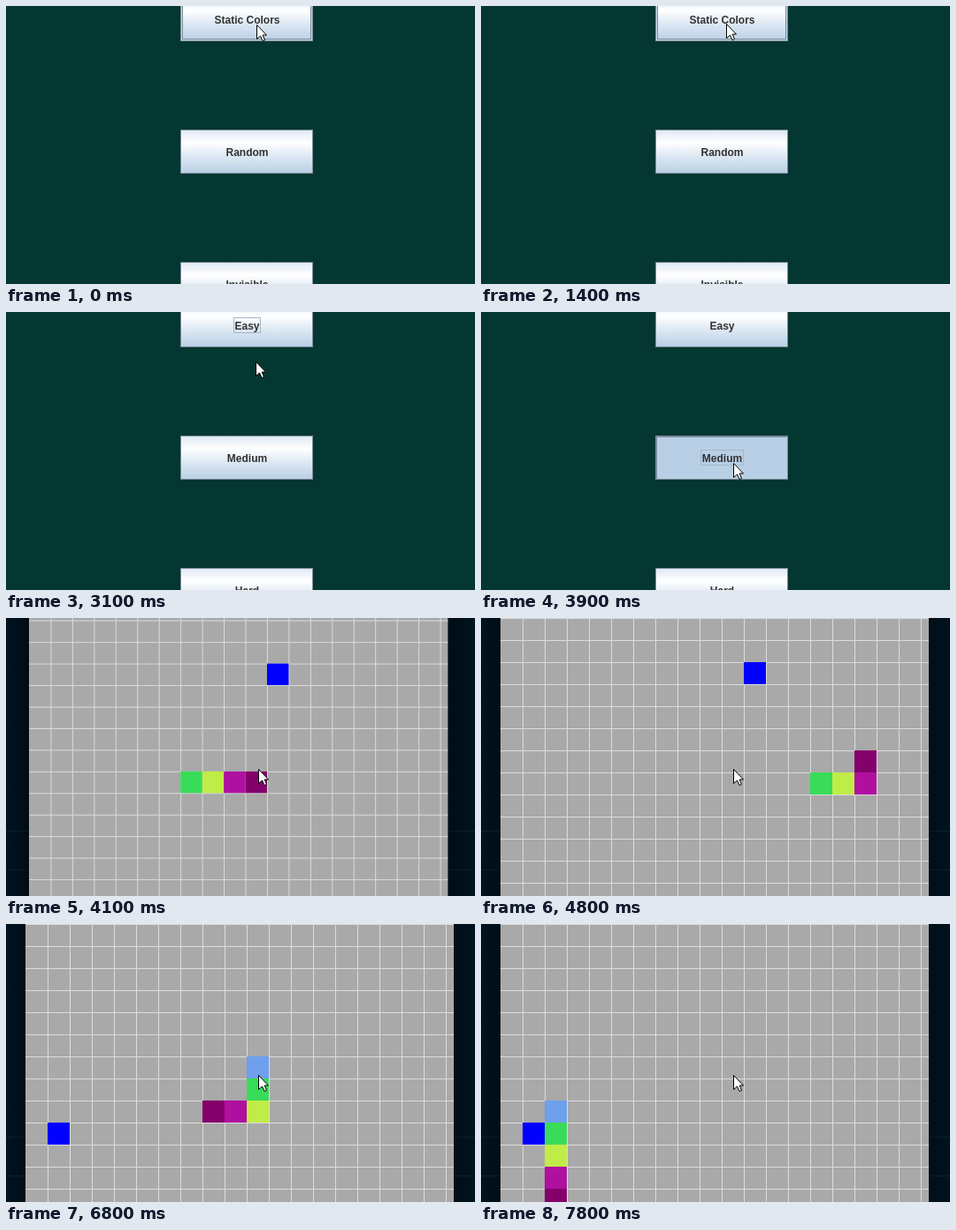
An HTML page with a canvas for the animation above (8 s loop, 530 px wide and 315 px high).

```html
<!DOCTYPE html>
<html lang="en">
<head>
<meta charset="utf-8">
<title>Snake menu</title>
<style>
  html, body { margin: 0; width: 100%; height: 100%; overflow: hidden; background: #043731; }
  canvas { display: block; }
</style>
</head>
<body>
<canvas id="stage" width="530" height="315"></canvas>
<script>
const ctx = document.getElementById('stage').getContext('2d');
const LOOP = 8000, STEP = 100;
const BORDER = '#7a8a99';
const MODES = ['Static Colors', 'Random', 'Invisible'];
const LEVELS = ['Easy', 'Medium', 'Hard'];
const BUTTON = { x: 197, w: 150, h: 50, tops: [-10, 140, 290] };

// Cursor keys: time, x, y
const CURSOR = [
  [0, 283, 21], [100, 283, 62], [300, 282, 296], [500, 276, 184],
  [900, 276, 184], [1400, 277, 20], [1800, 274, 172], [2500, 274, 172],
  [3000, 281, 18], [3400, 283, 171], [3600, 285, 171], [LOOP, 285, 171]
];

const CELL = 25, GRID_LEFT = 22, GRID_RIGHT = 506;
const SNAKE = ['#84006a', '#b010a0', '#c0ec48', '#38dc58', '#6ea0ee'];
const FOOD = '#0000ff';
const path = walk([[7, 7], [16, 7], [16, 2], [10, 2], [10, 8], [2, 8], [2, 12]]);
const FIRST_HEAD = 3, EATEN_AT = 19;

function walk(corners) {
  const cells = [corners[0]];
  for (const [tx, ty] of corners.slice(1)) {
    let [x, y] = cells[cells.length - 1];
    while (x !== tx || y !== ty) {
      x += Math.sign(tx - x);
      y += Math.sign(ty - y);
      cells.push([x, y]);
    }
  }
  return cells;
}

function rect(color, x, y, w, h) {
  ctx.fillStyle = color;
  ctx.fillRect(x, y, w, h);
}

function frame(color, x, y, w, h) {
  ctx.strokeStyle = color;
  ctx.lineWidth = 1;
  ctx.strokeRect(x + .5, y + .5, w - 1, h - 1);
}

function cursorAt(t) {
  const i = CURSOR.findIndex(key => key[0] > t);
  const [t0, x0, y0] = CURSOR[i - 1], [t1, x1, y1] = CURSOR[i];
  const p = (t - t0) / (t1 - t0);
  return [Math.round(x0 + (x1 - x0) * p), Math.round(y0 + (y1 - y0) * p)];
}

function drawCursor([x, y]) {
  const outline = [[0, 0], [0, 16], [4, 12.5], [6.5, 18], [9, 17], [6.7, 11.5], [11, 11.5]];
  ctx.beginPath();
  for (const [dx, dy] of outline) ctx.lineTo(x + dx + .5, y + dy + .5);
  ctx.closePath();
  ctx.fillStyle = '#fff';
  ctx.strokeStyle = '#000';
  ctx.lineWidth = 1;
  ctx.fill();
  ctx.stroke();
}

function drawButton(label, y, { hover, pressed, focus }) {
  const { x, w, h } = BUTTON;
  if (pressed) {
    rect('#b8cfe5', x, y, w, h);
    frame(BORDER, x, y, w, h);
    rect(BORDER, x, y, w, 2);
    rect(BORDER, x, y, 2, h);
  } else {
    const shade = ctx.createLinearGradient(0, y, 0, y + h);
    [[0, '#dde8f3'], [.3, '#fff'], [.6, '#dde8f3'], [1, '#b8cfe5']]
      .forEach(stop => shade.addColorStop(...stop));
    rect(shade, x, y, w, h);
    frame(BORDER, x, y, w, h);
    if (hover) {
      frame('#c8dbee', x + 1, y + 1, w - 2, h - 2);
      frame(BORDER, x + 2, y + 2, w - 4, h - 4);
    }
  }
  ctx.font = 'bold 12px "Liberation Sans", Arial, sans-serif';
  ctx.textAlign = 'center';
  ctx.fillStyle = '#333';
  ctx.fillText(label, x + w / 2 + .5, y + 30);
  if (focus) {
    const half = Math.round(ctx.measureText(label).width / 2) + 1;
    frame('#a3b8cc', x + w / 2 - half, y + 16, half * 2 + 1, 18);
  }
}

function drawMenu(t, [cx, cy]) {
  const levels = t >= 2000;
  const clicked = t === 1900 || t === 3900;
  const focused = clicked ? 1 : t >= 2100 ? 0 : -1;
  rect('#043731', 0, 0, 530, 315);
  (levels ? LEVELS : MODES).forEach((label, i) => {
    const top = BUTTON.tops[i];
    drawButton(label, top, {
      hover: cy >= top && cy < top + BUTTON.h,
      pressed: clicked && i === 1,
      focus: focused === i
    });
  });
}

function headIndex(t) {
  let moves = Math.max(0, (t - 4100) / STEP);
  for (const pause of [5400, 6500, 7300]) if (t >= pause) moves--;
  if (t >= 7000) moves++;
  return Math.min(FIRST_HEAD + moves, path.length - 1);
}

function drawCell([col, row], color) {
  rect(color, GRID_LEFT + col * CELL, row * CELL, CELL, CELL);
}

function drawDesktop() {
  rect('#001320', 0, 0, 530, 315);
  for (const y of [241, 285]) rect('#0c2430', 0, y, 530, 1);
  for (const [outer, inner] of [[0, 26], [530, 499]]) {
    const shadow = ctx.createLinearGradient(outer, 0, inner, 0);
    shadow.addColorStop(0, 'rgba(0,0,0,0)');
    shadow.addColorStop(1, 'rgba(0,0,0,.35)');
    rect(shadow, Math.min(outer, inner), 0, Math.abs(outer - inner), 315);
  }
}

function drawGame(t) {
  drawDesktop();
  ctx.save();
  // The window fades in while it grows
  const scale = t < 4100 ? .93 : t < 4200 ? .978 : 1;
  ctx.translate(204 * (1 - scale), 123 * (1 - scale));
  ctx.scale(scale, scale);
  if (t < 4100) ctx.globalAlpha = .5;

  rect('#a9a9a9', GRID_LEFT, -50, GRID_RIGHT - GRID_LEFT, 425);
  for (let x = GRID_LEFT + CELL; x < GRID_RIGHT; x += CELL) rect('#dcdcdc', x, -50, 1, 425);
  for (let y = -50; y < 375; y += CELL) rect('#dcdcdc', GRID_LEFT, y, GRID_RIGHT - GRID_LEFT, 1);

  const head = headIndex(t), eaten = head >= EATEN_AT;
  drawCell(eaten ? [1, 9] : [11, 2], FOOD);
  SNAKE.slice(0, eaten ? 5 : 4).forEach((color, i) => drawCell(path[head - i], color));
  ctx.restore();
}

function render(now) {
  const t = Math.floor(now % LOOP / STEP) * STEP;
  const cursor = cursorAt(t);
  if (t < 4000) drawMenu(t, cursor);
  else drawGame(t);
  drawCursor(cursor);
}

let start;
function tick(now) {
  start ??= now;
  render(now - start);
  requestAnimationFrame(tick);
}
render(0);
requestAnimationFrame(tick);
</script>
</body>
</html>
```
